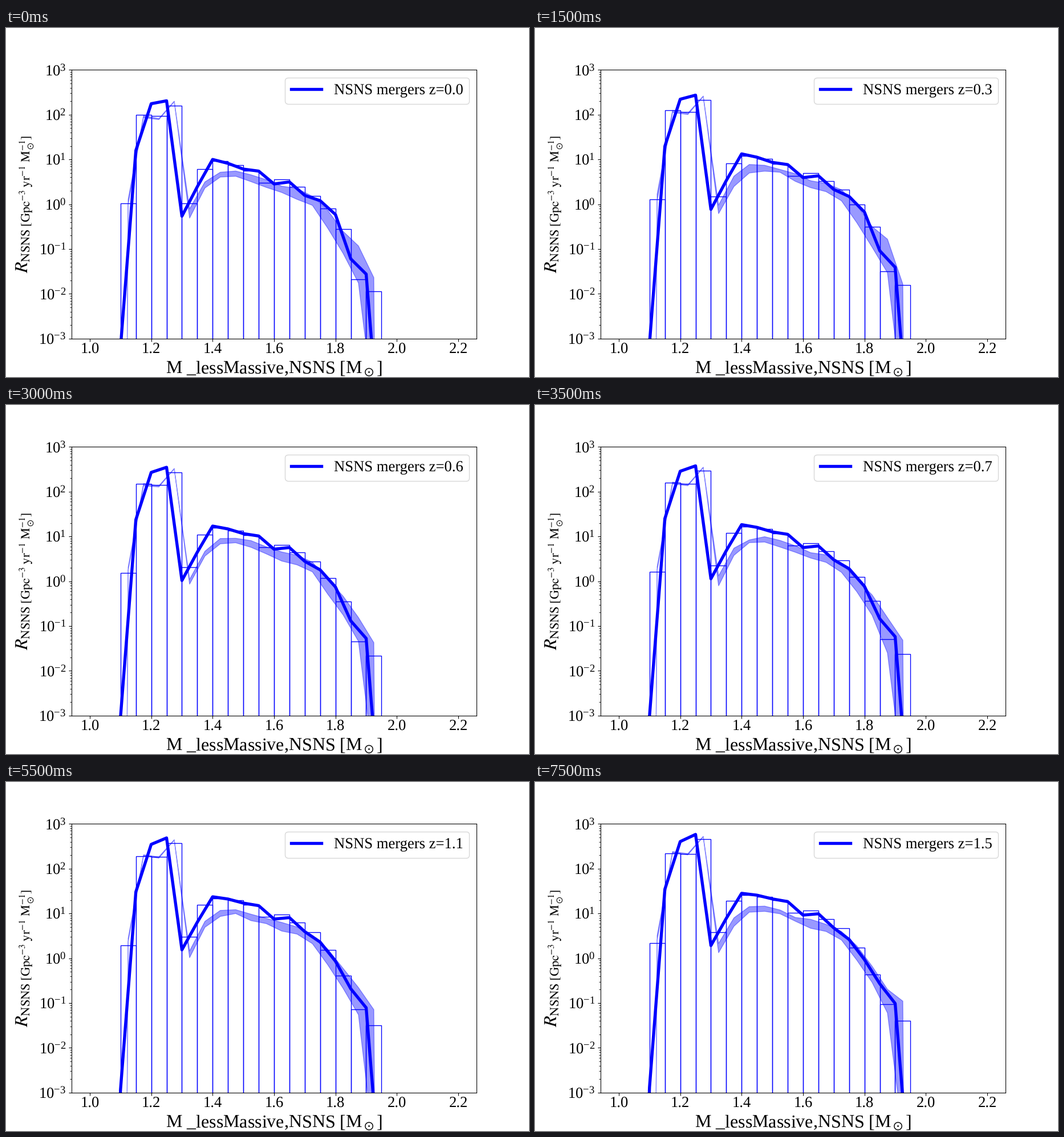
These frames come from a looping animation (917x611 px, 8 s). A matplotlib script:

```python
import numpy as np
import matplotlib.pyplot as plt
from matplotlib.animation import FuncAnimation

W, H, DPI = 917, 611, 96
FRAMES, INTERVAL = 16, 500
BIN = .05
FLOOR = 1e-6
NONE = -50  # log rate of an empty bin

plt.rcParams.update({
    "font.family": "Liberation Serif",
    "mathtext.fontset": "stix",
    "text.hinting": "no_hinting",
    "font.size": 20,
    "axes.labelsize": 24,
})

# log10 of the rates at z = 0, one value per mass bin
bar_base = np.array([.02, 2, 1.965, 2.2, .026, .78, .96, .88, .75, .485, .55,
                     .385, .19, -.1, -.56, -1.68, -1.95])
line_base = np.array([-12.4, -3.2, 1.2, 2.245, 2.31, -.267, .39, 1, .913, .785,
                      .74, .453, .498, .198, .08, -.23, -1.22, -1.56, -5.8])
low_base = np.array([NONE, 0, 1.93, 1.89, 2.29, -.32, .33, .587, .638, .53,
                     .39, .262, .173, -.018, -.477, -1.05, -1.7, -4.53, NONE])

bar_x = 1.1 + BIN * np.arange(len(bar_base))
line_x = 1.05 + BIN * np.arange(len(line_base))
band_x = 1.075 + BIN * np.arange(len(low_base))

# spread of the band, wide where few systems merge
spread = np.interp(band_x,
                   [1.125, 1.175, 1.275, 1.325, 1.475, 1.725, 1.825, 1.875, 1.925],
                   [.11, .04, .01, .19, .12, .2, .43, .73, 2.97])


def rise(x):
    """Total growth of the log rate over the loop at mass x."""
    return np.interp(x, [1.1, 1.2, 1.3, 1.4, 1.5, 1.7, 1.8, 1.85, 1.9],
                     [.32, .36, .55, .45, .54, .48, .2, .65, .55])


def growth(z):
    s = z / 1.5
    return s + .48 * s * (1 - s)


def rates(base, x, z):
    return 10 ** (base + rise(x) * growth(z))


def band_edges(i):
    rng = np.random.default_rng(i)
    noise = .15 * np.minimum(spread, .8) * rng.standard_normal((2, len(band_x)))
    low = low_base + .42 * growth(i / 10)
    return 10 ** (low + noise[0]), 10 ** (low + spread + noise[1])


def band_outline(i):
    low, up = (np.column_stack([band_x, y]) for y in band_edges(i))
    return np.vstack([up, low[::-1]])


def title(z):
    return f"NSNS mergers z={z:.1f}"


fig, ax = plt.subplots(figsize=(W / DPI, H / DPI), dpi=DPI)
ax.set_yscale("log")
bars = ax.bar(bar_x, rates(bar_base, bar_x, 0) - FLOOR, BIN, bottom=FLOOR,
              align="edge", fill=False, edgecolor="b", lw=1)
band = ax.fill_between(band_x, *band_edges(0), color="b", alpha=.4)
line, = ax.plot(line_x, rates(line_base, line_x, 0), "b", lw=4, label=title(0))
legend = ax.legend(loc="upper right")

ax.set_xlim(.94, 2.26)
ax.set_ylim(1e-3, 1e3)
ax.set_xticks(np.linspace(1, 2.2, 7))
ax.tick_params(axis="x", pad=1.7)
ax.set_xlabel(r"M _lessMassive,NSNS [M$_\odot$]", labelpad=4.5)
ax.set_ylabel(r"$R_{\mathrm{NSNS\;[Gpc^{-3}\;yr^{-1}\;M_\odot^{-1}]}}$")


def update(i):
    z = i / 10
    for bar, r in zip(bars, rates(bar_base, bar_x, z)):
        bar.set_height(r - FLOOR)
    line.set_ydata(rates(line_base, line_x, z))
    band.set_verts([band_outline(i)])
    legend.get_texts()[0].set_text(title(z))


anim = FuncAnimation(fig, update, frames=FRAMES, interval=INTERVAL,
                     repeat=True, repeat_delay=0)
plt.show()
```
